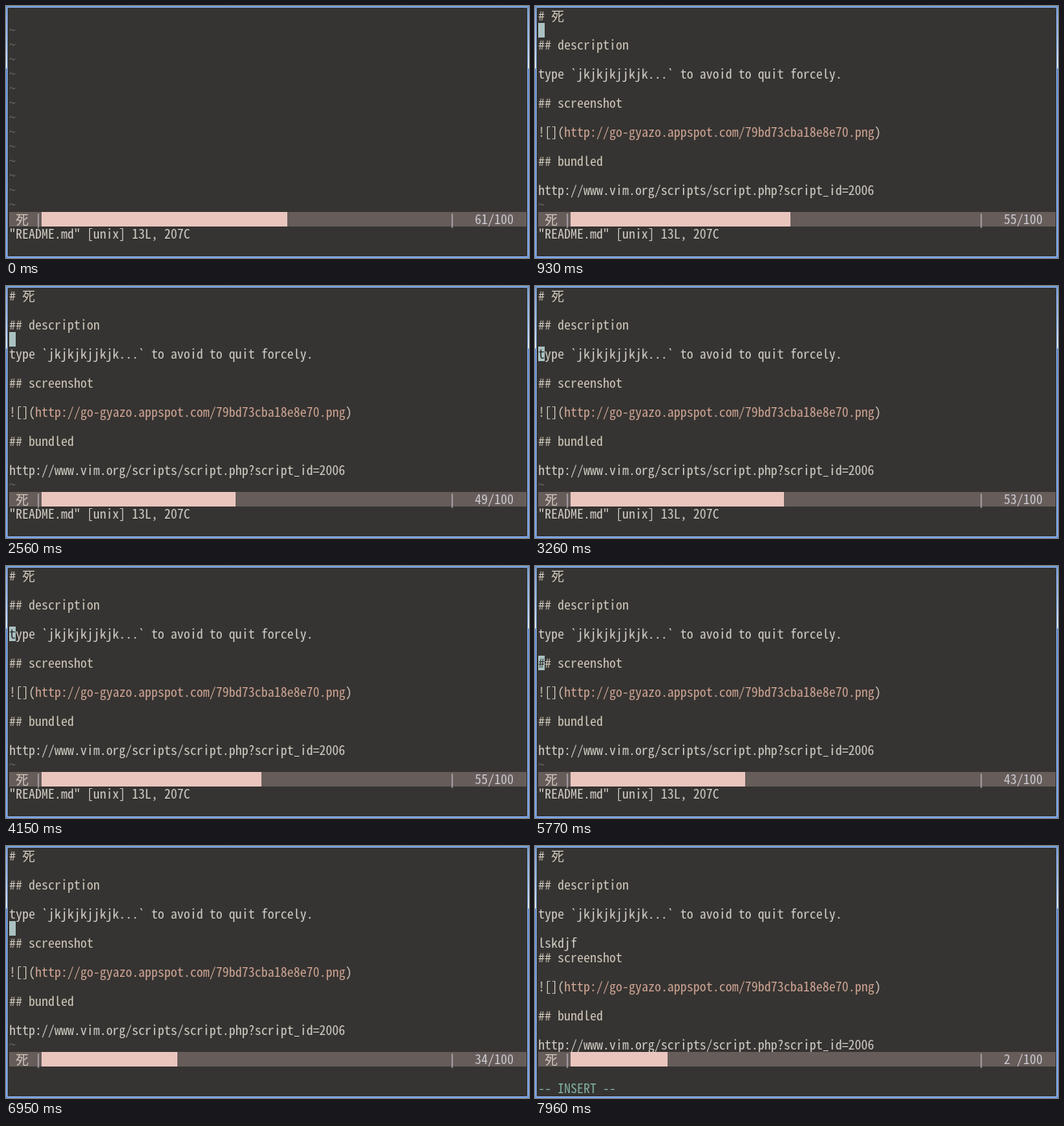
An HTML page for the animation above (8000 ms loop, 647x312 px).

```html
<!DOCTYPE html>
<html lang="en">
<head>
<meta charset="utf-8">
<title>Editor</title>
<style>
  html, body { margin: 0; width: 100%; height: 100%; overflow: hidden; background: #5f8fd0; }
  svg { display: block; width: 647px; height: 312px; }
  text { font-family: "Noto Sans Mono CJK JP", "Noto Sans Mono", "Noto Sans CJK JP", monospace; white-space: pre; }
</style>
</head>
<body>
<svg viewBox="0 0 647 312">
  <defs>
    <linearGradient id="edge" x2="0" y2="1">
      <stop offset="0" stop-color="#6a94cf"/>
      <stop offset=".12" stop-color="#9dbbe6"/>
      <stop offset=".245" stop-color="#f0f5fc"/>
      <stop offset=".25" stop-color="#4a80d0"/>
      <stop offset="1" stop-color="#6e9cee"/>
    </linearGradient>
  </defs>
  <rect width="647" height="312" fill="url(#edge)"/>
  <rect x="1.5" y="1.5" width="644" height="309" rx="2" fill="#363432" stroke="#94b9f4"/>
  <g id="screen"></g>
</svg>
<script>
const LOOP = 8000, CELL = 8, ROW = 18, LEFT = 4, TOP = 3;
const COLOR = {
  text: "#d2cdc6", title: "#d0c8bb", link: "#cfa594", tilde: "#6a6764", mode: "#7fb0a0",
  cursor: "#a9c1c1", dark: "#2e2c2a", status: "#665c5a", bar: "#e9c5be", count: "#cdcbd2"
};
const README = [
  "# 死", "", "## description", "",
  "type `jkjkjkjjkjk...` to avoid to quit forcely.", "",
  "## screenshot", "",
  "![](http://go-gyazo.appspot.com/79bd73cba18e8e70.png)", "",
  "## bundled", "",
  "http://www.vim.org/scripts/script.php?script_id=2006"
];
// [time, life left]
const LIFE = [
  [0, 61.9], [180, 61], [1950, 47.5], [2090, 46.5], [3260, 53.5], [4150, 55.5], [4540, 56],
  [4690, 55], [5770, 43.5], [6950, 34.9], [7070, 34.05], [7960, 24.5], [8000, 24.2]
];
// [time, cursor row]
const MOVES = [
  [180, 0], [800, 1], [1500, 2], [1700, 3], [1890, 4], [4750, 3], [4900, 4],
  [5560, 5], [5680, 6], [5900, 5], [7100, 6]
];
const TYPED = "lskdjf", TYPE_START = 7240, TYPE_STEP = 115;
const OPEN_LINE = 7100, REPAINT = 7940;

const screen = document.getElementById("screen");
const probe = document.createElement("canvas").getContext("2d");
probe.font = '16px "Noto Sans Mono CJK JP", "Noto Sans Mono", "Noto Sans CJK JP", monospace';
screen.setAttribute("font-size", 16 * CELL / probe.measureText("0").width);

const put = (row, col, text, color) =>
  `<text x="${LEFT + col * CELL}" y="${TOP + row * ROW + 15}" fill="${color}">${text}</text>`;
const block = (row, col, cols, color) =>
  `<rect x="${LEFT + col * CELL}" y="${TOP + row * ROW}" width="${cols * CELL}" height="${ROW}" fill="${color}"/>`;

function lifeAt(t) {
  const i = LIFE.findIndex(([time]) => time > t);
  const [t0, a] = LIFE[i - 1], [t1, b] = LIFE[i];
  return Math.floor(a + (b - a) * (t - t0) / (t1 - t0));
}

function cursorRow(t) {
  if (t >= 2090 && t < 4600) return Math.floor((t - 3200) / 140) % 2 ? 3 : 4;
  return MOVES.filter(([time]) => time <= t).pop()[1];
}

function drawLine(line, row) {
  if (line.startsWith("#")) return put(row, 0, line, COLOR.title);
  if (line.startsWith("![")) {
    return put(row, 0, "![](", COLOR.title) + put(row, 4, line.slice(4, -1), COLOR.link) +
      put(row, line.length - 1, ")", COLOR.title);
  }
  return put(row, 0, line, COLOR.text);
}

function drawCursor(t, lines, typed) {
  if (t < 180 || t >= REPAINT) return "";
  const row = cursorRow(t);
  const glyph = t > 1890 && t < 2000 ? "" : lines[row][typed] || "";
  return block(row, typed, 1, COLOR.cursor) + put(row, typed, glyph, COLOR.dark);
}

function drawStatus(t) {
  const life = lifeAt(t);
  const shown = t >= REPAINT ? String(life)[0] + " " : life;
  return block(14, 0, 80, COLOR.status) + block(14, 5, Math.floor(life * 63 / 100), COLOR.bar) +
    put(14, 1, "死", COLOR.title) + put(14, 4, "|", COLOR.count) +
    put(14, 68, "|", COLOR.count) + put(14, 72, shown + "/100", COLOR.count);
}

function drawMessage(t) {
  if (t < 6200) return put(15, 0, '"README.md" [unix] 13L, 207C', COLOR.text);
  const inserting = t < 6500 || t >= OPEN_LINE;
  return inserting ? put(16, 0, "-- INSERT --", COLOR.mode) : "";
}

function draw(t) {
  const typed = Math.max(0, Math.min(TYPED.length, Math.floor((t - TYPE_START) / TYPE_STEP) + 1));
  const lines = t < 180 ? [""] : [...README];
  if (t >= OPEN_LINE) lines.splice(6, 0, TYPED.slice(0, typed));
  let out = lines.map(drawLine).join("");
  for (let row = lines.length; row < 14; row++) out += put(row, 0, "~", COLOR.tilde);
  return out + drawCursor(t, lines, typed) + drawStatus(t) + drawMessage(t);
}

let last = "";
const start = performance.now();
function tick(now) {
  const picture = draw(Math.max(0, now - start) % LOOP);
  if (picture !== last) screen.innerHTML = last = picture;
  requestAnimationFrame(tick);
}
tick(start);
</script>
</body>
</html>
```
